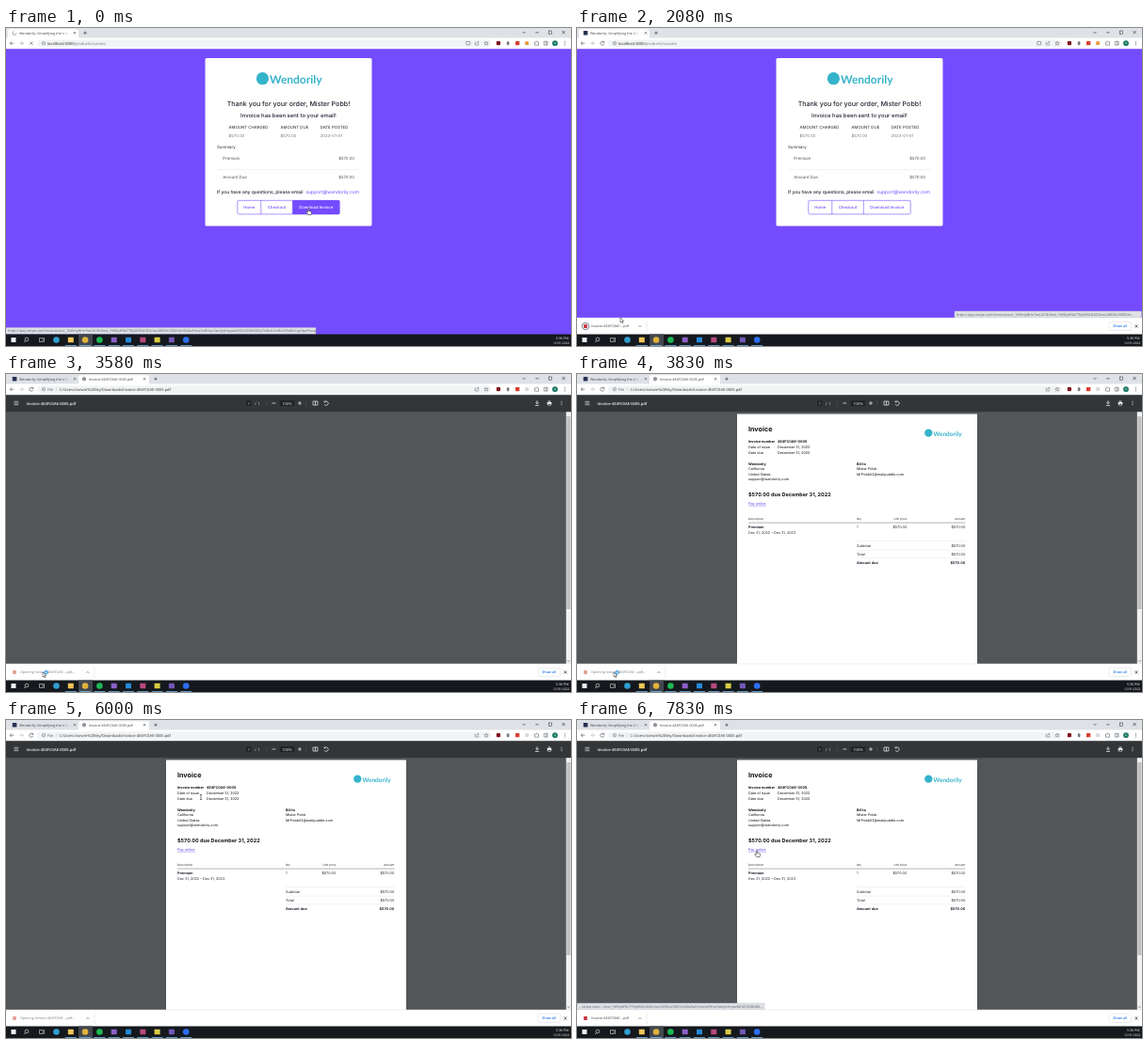
Animation, 600 px wide and 338 px high, one loop 8 s. Source, as an HTML page:

```html
<!DOCTYPE html>
<html lang="en">
<head>
<meta charset="utf-8">
<title>Invoice download</title>
<style>
html, body { margin: 0; width: 100%; height: 100%; overflow: hidden; background: #fff; }
svg { display: block; width: 600px; height: 338px; text-rendering: geometricPrecision; }
.ui { font-family: "Open Sans", "Noto Sans", sans-serif; }
.page { font-family: Inter, Roboto, sans-serif; }
.logo { font-family: Lato, sans-serif; font-weight: 700; }
</style>
</head>
<body>
<svg id="stage" viewBox="0 0 600 338"></svg>
<script>
const PURPLE = '#744bff', INK = '#1f2330', GREY = '#5f6368', TEAL = '#35b3cb';
const LOOP = 8000, FPS = 12;
const BRAND = 'Wendorily', MAIL = 'support@wendorily.com', BUYER = 'Mister Pobb';
const URL_TEXT = 'https://pay.stripe.com/invoice/acct_1MAHyBHnTvnUX18i/test_YWNjdF8xTTRyWXlCd3ZiUmc2WDhUYBDVzhIZkZwFnhaSnRHnpTatxfytHnpwMHZUS3BtM0Zo2YzBrEzYzBzU00aRnCypYqxFfscap';
const FILE = 'Invoice-4E4FC0AE-0005.pdf';

const rect = (x, y, w, h, fill, r = 0, more = '') =>
  `<rect x="${x}" y="${y}" width="${w}" height="${h}" rx="${r}" fill="${fill}" ${more}/>`;
const dot = (x, y, r, fill, more = '') => `<circle cx="${x}" cy="${y}" r="${r}" fill="${fill}" ${more}/>`;
const line = (d, color = GREY, w = .7, fill = 'none') =>
  `<path d="${d}" fill="${fill}" stroke="${color}" stroke-width="${w}"/>`;
const text = (x, y, size, str, fill = INK, weight = 400, anchor = 'start') =>
  `<text x="${x}" y="${y}" font-size="${size}" fill="${fill}" font-weight="${weight}" text-anchor="${anchor}">${str}</text>`;
const group = (cls, body, more = '') => `<g class="${cls}" ${more}>${body}</g>`;
const cross = (x, y, r, color) => line(`M${x - r} ${y - r}l${2 * r} ${2 * r}m0 ${-2 * r}l${-2 * r} ${2 * r}`, color);
const plus = (x, y, r, color) => line(`M${x - r} ${y}h${2 * r}m${-r} ${-r}v${2 * r}`, color);
const kebab = (x, y, color) => [-1.8, 0, 1.8].map(d => dot(x, y + d, .5, color)).join('');
const ramp = (t, a, b) => Math.max(0, Math.min(1, (t - a) / (b - a)));
const ease = p => p * p * (3 - 2 * p);

// time, x, y of the pointer tip
const PATH = [[0, 321, 192], [250, 321, 192], [830, 335, 219], [1000, 335, 219], [2000, 46, 308],
  [2350, 46, 308], [2750, 38, 317], [3420, 38, 317], [3580, 39, 317], [5000, 39, 317],
  [5670, 207, 82], [6000, 207, 82], [6700, 191, 139], [LOOP, 191, 139]];

function pointerAt(t) {
  const i = PATH.findIndex(k => k[0] > t);
  const [a, b] = [PATH[i - 1], PATH[i]], p = ease(ramp(t, a[0], b[0]));
  return [a[1] + (b[1] - a[1]) * p, a[2] + (b[2] - a[2]) * p];
}

function spinner(x, y, r, t, color) {
  return `<circle cx="${x}" cy="${y}" r="${r}" fill="none" stroke="${color}" stroke-width=".8"
    stroke-dasharray="${r * 4} ${r * 2.3}" transform="rotate(${t * .36} ${x} ${y})"/>`;
}

function browser(t, pdf, loading) {
  const active = pdf ? 77 : 2, tabEnd = pdf ? 152 : 77;
  let s = rect(0, 0, 600, 11, '#dee1e6') + rect(active, 1.3, 75, 12, '#fff', 2) + rect(0, 10.5, 600, 11.7, '#fff');
  s += loading ? spinner(9, 5.3, 2, t, '#8a8d91') : rect(6.8, 3, 4.6, 4.6, '#27304f', .6);
  s += text(14, 6.8, 3.7, BRAND + ': Simplifying the U.S. v', '#3c4043');
  s += rect(59, 2, 10, 7, pdf ? 'url(#fadeTab)' : 'url(#fadeWhite)') + cross(73, 5.2, 1.2, GREY);
  if (pdf) {
    s += dot(83, 5.3, 2, '#5f6368') + line('M81 5.3h4M83 3.3v4', '#fff', .4);
    s += text(88, 6.8, 3.7, FILE, '#3c4043') + cross(147, 5.2, 1.2, GREY);
  }
  s += plus(tabEnd + 7, 5.2, 1.6, '#3c4043');
  s += line('M548.5 4l1.5 1.5 1.5-1.5M562.3 4.8h3.4M590.5 3l3.2 3.2m0-3.2l-3.2 3.2', '#222', .6);
  s += rect(576.4, 3, 3.2, 3.2, 'none', 0, 'stroke="#222" stroke-width=".5"');

  s += line('M8.4 16.2H4.2m1.9-1.9l-1.9 1.9 1.9 1.9');
  s += line('M14.2 16.2h4.2m-1.9-1.9l1.9 1.9-1.9 1.9', pdf ? '#bbb' : '#aaa');
  s += loading ? cross(27, 16.2, 1.6, GREY) : line('M28.5 15a2 2 0 1 0 .3 1.8M28.8 13.8v1.6h-1.6');
  s += rect(33, 12.4, 482, 7.7, '#f1f3f4', 3.8);
  s += dot(40, 16.2, 1.7, 'none', `stroke="${GREY}" stroke-width=".5"`) + line('M40 15.9v1.3M40 15v.4', GREY, .5);
  s += pdf
    ? text(44, 17.8, 4, 'File', GREY) + line('M53.4 14v4.4', '#bbb', .4) +
      text(56.5, 17.8, 4, 'C:/Users/corwin%20Vey/Downloads/' + FILE, '#333')
    : text(44, 17.8, 4.1, 'localhost:3000<tspan fill="#70757a">/products/success</tspan>', '#222') +
      rect(488.8, 14.4, 4, 3.4, 'none', .5, `stroke="${GREY}" stroke-width=".6"`);
  s += line('M499 15.2h-.8v2.8h3.6v-1.3M499.6 16.6c.2-1.4 1-1.8 2.4-1.8m-1-.9l1.1.9-1.1 1', GREY, .5);
  s += line('M510 14l.6 1.5 1.6.1-1.2 1 .4 1.6-1.4-.9-1.4.9.4-1.6-1.2-1 1.6-.1z', GREY, .5);
  s += rect(520.8, 14, 4.2, 4.2, '#7d1420', 1) + rect(531.8, 14.2, 2.6, 4, '#757b84', 1) + rect(541, 14, 4.3, 4.3, '#d8402f', .5);
  s += pdf ? rect(551.2, 14.3, 3.8, 3.8, '#d5d7da', .5) : rect(551.2, 14.3, 3.8, 3.8, '#e59a3c', .5);
  s += line('M561.5 15h1.2a.8.8 0 0 1 1.6 0h1.2v3.2h-4zM571.3 14.3h3.8v3.8h-3.8zM573.7 14.3v3.8', GREY, .6);
  return s + dot(583, 16.2, 2.9, '#217a68') + dot(583, 16.2, 1.1, '#5cb39e') + kebab(593.5, 16.2, GREY);
}

function logo(x, y, size, r) {
  return dot(x - r - 1, y - r * .8, r, TEAL) + group('logo', text(x, y, size, BRAND, TEAL, 700));
}

function orderPage(hover) {
  const mute = '#71757f';
  let s = rect(0, 22, 600, 304, PURPLE) + rect(211, 32, 178, 179.4, '#5c39d8', 2, 'opacity=".35"') +
    rect(211.5, 32, 177, 178.5, '#fff', 1.6) + logo(280, 59, 12, 6.6);
  s += text(300, 83.2, 7.1, `Thank you for your order, ${BUYER}!`, INK, 500, 'middle');
  s += text(300, 95, 5.95, 'Invoice has been sent to your email!', INK, 500, 'middle');
  [[236.5, 'AMOUNT CHARGED', '$570.00'], [291.5, 'AMOUNT DUE', '$570.00'], [333.7, 'DATE POSTED', '2023-01-01']]
    .forEach(([x, head, val]) => s += text(x, 107, 4.35, head) + text(x, 115.6, 4.3, val, mute));
  s += text(224, 127.6, 4.4, 'Summary') + line('M224 150.6H376', '#e4e5ea', .5);
  [[140.3, 'Premium'], [160.3, 'Amount Due']].forEach(([y, label]) =>
    s += text(230.3, y, 4.35, label, '#4b4f5b') + text(370, y, 4.3, '$570.00', '#4b4f5b', 400, 'end'));
  s += text(224, 176, 4.9, 'If you have any questions, please email', INK, 500) + text(318.6, 176, 4.9, MAIL, PURPLE);
  s += rect(245.8, 183.3, 108.4, 14.6, '#fff', 1.5, `stroke="${PURPLE}" stroke-width=".6"`);
  s += line('M270.8 183.3v14.6M304.3 183.3v14.6', PURPLE, .6);
  if (hover) s += rect(304.3, 183.1, 50, 15, PURPLE, 1.2);
  [[258.3, 'Home'], [287.5, 'Checkout'], [329.2, 'Download Invoice']].forEach(([x, label], i) =>
    s += text(x, 192.2, 4.25, label, hover && i == 2 ? '#fff' : PURPLE, 500, 'middle'));
  return group('page', s);
}

function invoice() {
  const pair = (y, label, amount, w) => text(297, y, 3.8, label, INK, w) + text(412.3, y, 3.8, amount, INK, w, 'end');
  const column = (x, rows) => rows.map((r, i) => text(x, 96.7 + i * 5.55, 3.72, r, '#111', i ? 400 : 700)).join('');
  let s = rect(170, 42.5, 255, 266, '#fff') + text(182, 60.6, 7.2, 'Invoice', '#111', 700) + logo(378.5, 66, 6.5, 4.2);
  [['Invoice number', '4E4FC0AE-0005'], ['Date of issue', 'December 31, 2022'], ['Date due', 'December 31, 2022']]
    .forEach(([a, b], i) => {
      const y = 73.3 + i * 5.7, w = i ? 400 : 700;
      s += text(182, y, 3.72, a, '#111', w) + text(213, y, 3.72, b, '#111', w);
    });
  s += column(182, [BRAND, 'California', 'United States', MAIL]);
  s += column(297, ['Bill to', BUYER, 'MrPobb52@mailpuddle.com']);
  s += text(182, 130, 5.5, '$570.00 due December 31, 2022', '#111', 700);
  s += text(182, 139.2, 3.8, 'Pay online', '#6046e8') + line('M182 140.1h19', '#6046e8', .4);
  s += text(182, 155.4, 3, 'Description') + text(297, 155.4, 3, 'Qty') +
    text(350.3, 155.4, 3, 'Unit price', INK, 400, 'end') + text(412.3, 155.4, 3, 'Amount', INK, 400, 'end');
  s += line('M182 158.1H412.3', '#444', .4);
  s += text(182, 164.4, 3.8, 'Premium', INK, 700) + text(297, 164.4, 3.8, '1') +
    text(350.3, 164.4, 3.8, '$570.00', INK, 400, 'end') + text(412.3, 164.4, 3.8, '$570.00', INK, 400, 'end');
  s += text(182, 170.2, 3.72, 'Dec 31, 2022 – Dec 31, 2023');
  s += line('M297 177.6h115.3M297 187.2h115.3M297 195.9h115.3', '#ddd', .4);
  s += pair(184.3, 'Subtotal', '$570.00') + pair(193.1, 'Total', '$570.00') + pair(202.2, 'Amount due', '$570.00', 700);
  return group('page', s);
}

function viewer(ready) {
  const w = '#f1f1f1';
  let s = rect(0, 22, 600, 304, '#525659');
  if (ready) s += invoice();
  s += rect(594.8, 40, 5.2, 268, '#f1f1f1') + rect(595.3, 45, 4.2, 205, '#c1c1c1') + line('M596 304.4l1.4 1.4 1.4-1.4', '#555', .6);
  s += rect(0, 22, 600, 18.2, '#323639') + line('M8.5 29.3h4.8m-4.8 1.7h4.8m-4.8 1.7h4.8', w, .6);
  s += text(21.5, 32.5, 4.1, FILE, w, 600);
  s += rect(255.3, 28.2, 5, 5.8, '#202326') + text(257.8, 32.5, 4, '1', w, 400, 'middle') + text(264, 32.5, 4, '/&#160; 1', w);
  s += line('M276.7 28.5v5M318.7 28.5v5', '#63676b', .4) + line('M282.3 31h4', w) + rect(290.8, 28.2, 15.3, 5.8, '#202326') +
    text(298.4, 32.5, 4, '100%', w, 400, 'middle') + plus(312, 31, 2, w);
  s += line('M326 29h5v4h-5zM328.5 29v4M338.3 29.7a2.2 2.2 0 1 1-.2 2.6M338 28.4v1.5h1.6', w, .7);
  s += line('M564 28.3v3.2m-1.6-1.4l1.6 1.6 1.6-1.6M562 33.4h4', w, .8);
  s += rect(574.7, 30, 4.6, 2.6, w, .4) + rect(575.6, 28.6, 2.8, 1, w) + rect(575.8, 31.6, 2.4, 2, '#323639', 0, `stroke="${w}" stroke-width=".5"`);
  return group('ui', s + kebab(590, 31, w));
}

function statusBar(x, bottom, w, str, alpha) {
  return group('ui', rect(x, bottom - 7, w, 7, '#dee1e6', .8, 'stroke="#b9bcc2" stroke-width=".4"') +
    text(x + 2, bottom - 2.2, 3.75, str, GREY), `opacity="${alpha}"`);
}

function shelf(t, top) {
  const opening = t > 3490 && t < 7570, named = t > 1240;
  const end = opening ? 94 : named ? 74 : 53, y = top + 9;
  const label = opening ? 'Opening Invoice-4E4FC0AE-...pdf...' : named ? 'Invoice-4E4FC0AE-...pdf' : 'Invoice-404...';
  let s = rect(0, top, 600, 18, '#fff') + line(`M0 ${top}h600`, '#d5d7da', .4);
  if (t > 2600 && t < 3490) s += rect(2, top + 1, 61, 15.6, t > 3300 ? '#d0d1d3' : '#e4e5e7', 1.5);
  if (t < 2900) s += named ? dot(9, y, 3.7, '#fff', 'stroke="#6d7787" stroke-width=".9"') : spinner(9, y, 3.5, t, '#1a73e8');
  s += rect(7.2, y - 1.9, 3.6, 3.8, opening ? '#e69a95' : named ? '#c9303a' : '#a7adb8', .4);
  s += text(15.2, y + 1.3, 3.65, label, opening ? '#777b80' : '#3c4043');
  s += line(`M${end - 8.5} ${y + .8}l1.4-1.4 1.4 1.4`) + line(`M${end} ${top + 3}v12`, '#d5d7da', .5);
  s += rect(565, y - 4.6, 23.5, 9, '#fff', 1.3, 'stroke="#d5d7da" stroke-width=".5"') +
    text(576.7, y + 1.2, 3.7, 'Show all', '#1a73e8', 600, 'middle') + cross(594, y, 1.5, '#3c4043');
  return group('ui', s);
}

function arrowBadge(t) {
  const p = ramp(t, 580, 1000), alpha = Math.min(ramp(t, 500, 750), 1 - ramp(t, 920, 1250));
  const y = 290 + 13 * p;
  return group('', dot(11.8, y, 9, '#fff') + line(`M11.8 ${y - 5}v5`, '#1a73e8', 3.2) +
    line(`M7.5 ${y - .6}h8.6l-4.3 4.3zM7 ${y + 5}h9.6`, '#1a73e8', .9, '#1a73e8'), `opacity="${alpha}"`);
}

function taskbar() {
  const icons = ['#2f9fd0', '#f0c558', '#dfb23b', '#1db954', '#8b5fc7', '#2489d8', '#b8497f', '#d9cc45', '#7258b8', '#2d6ff2'];
  let s = rect(0, 325.5, 600, 12.5, '#15181d') + rect(77, 325.5, 15, 12.5, '#42474e');
  s += rect(5.5, 329, 5, 5, '#eef3f7');
  s += dot(22, 331, 1.9, 'none', 'stroke="#eee" stroke-width=".6"') + line('M20.7 332.4l-1.6 1.7', '#eee');
  s += line('M35.5 329.5h3.6v4h-3.6zM40.5 329v5', '#ddd', .6);
  icons.forEach((c, i) => {
    const x = 53.5 + i * 15.3;
    s += [0, 2, 3, 9].includes(i) ? dot(x, 331.5, 3.3, c) : rect(x - 3, 328.7, 6, 5.6, c, .5);
    if (i) s += rect(x - 6, 337.2, 12, .8, '#76b9ed');
  });
  s += text(597.5, 330.7, 3.6, '5:36 PM', '#fff', 400, 'end') + text(598.5, 336.3, 3.3, '12/31/2022', '#fff', 400, 'end');
  return group('ui', s);
}

function pointer(t) {
  const [x, y] = pointerAt(t);
  const hand = (t < 830 && y < 198) || t > 6580, beam = t > 5580 && t < 6580;
  let s;
  if (hand) s = line('M-.6 .4a.6.6 0 0 1 1.2 0v2l2.3.5q.8.2.7 1.1l-.5 2.5H-.4L-2.3 3.9q.1-.8.9-.4l.8.6z', '#111', .5, '#fff');
  else if (beam) s = line('M-1.1-2.6h2.2M0-2.6v5.2M-1.1 2.6h2.2', '#222', .6);
  else s = line('M0 0v5l1.2-1.1.8 1.9.9-.4-.8-1.8h1.6z', '#111', .45, '#fff');
  if (t > 3490 && t < 4250) s += dot(3.6, .2, 1.7, '#bfe3ff', 'stroke="#1683d8" stroke-width="1"');
  return `<g transform="translate(${x} ${y})">${s}</g>`;
}

const fade = (id, c) => `<linearGradient id="${id}"><stop stop-color="${c}" stop-opacity="0"/><stop offset="1" stop-color="${c}"/></linearGradient>`;
const DEFS = `<defs>${fade('fadeWhite', '#fff')}${fade('fadeTab', '#dee1e6')}</defs>`;

function scene(t) {
  const pdf = t > 3490, top = 325.5 - 17.5 * ease(ramp(t, 480, 680));
  let s = DEFS + (pdf ? viewer(t > 3650) : orderPage(t < 830 && pointerAt(t)[1] < 198));
  s += group('ui', browser(t, pdf, t < 490));
  if (t < 490) s += statusBar(0, 325.5, 329, URL_TEXT, 1);
  else if (t < 1740) s += statusBar(0, top, 199, URL_TEXT.slice(0, 92) + '...', 1);
  else if (t < 2500) s += statusBar(401, top, 198.5, URL_TEXT.slice(0, 92) + '...', 1 - ramp(t, 2240, 2500));
  if (t > 6990) s += statusBar(0, top, 199, '...stripe.com/.../' + URL_TEXT.slice(53, 128) + '...', ramp(t, 6920, 7160));
  if (t > 490) s += shelf(t, top);
  if (t > 500 && t < 1250) s += arrowBadge(t);
  return s + taskbar() + pointer(t);
}

const stage = document.getElementById('stage'), start = performance.now();
let shown = -1;
function tick() {
  // small lead so that steps land on whole hundredths of a second
  const step = Math.floor((performance.now() - start + 4) % LOOP * FPS / 1000);
  if (step !== shown) stage.innerHTML = scene((shown = step) * 1000 / FPS);
  requestAnimationFrame(tick);
}
tick();
</script>
</body>
</html>
```
